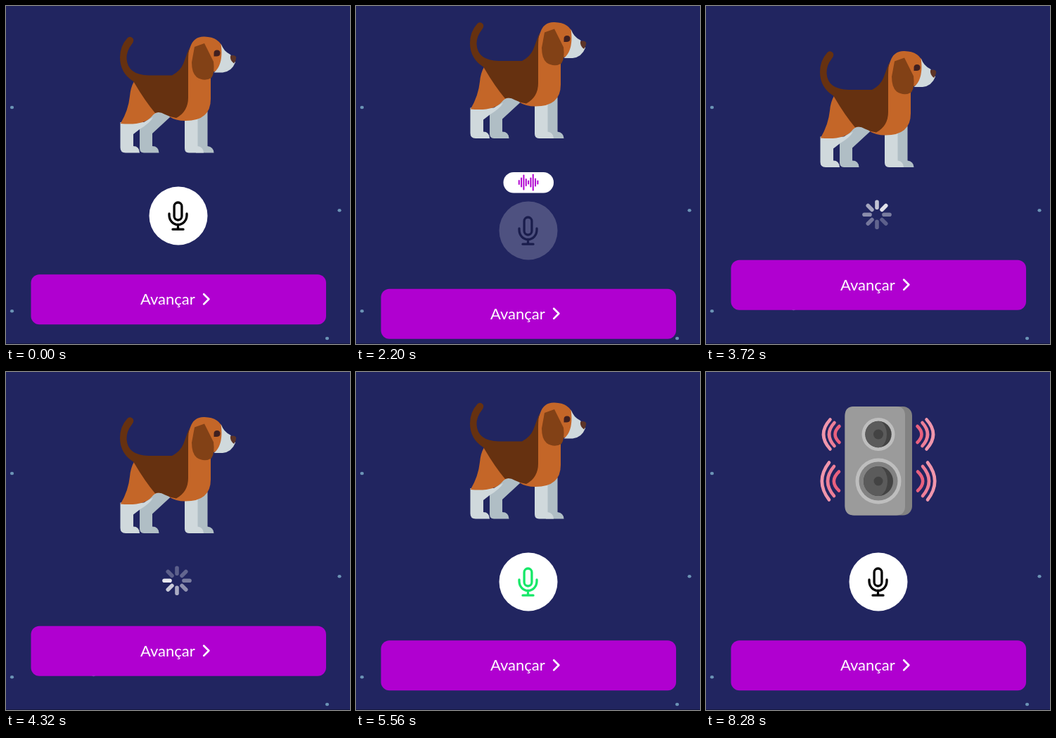
Recreate the animation shown at these times as an HTML page. Size 489 px wide and 480 px high, loop 9520 ms.

```html
<!DOCTYPE html>
<html lang="pt">
<head>
<meta charset="utf-8">
<title>Avançar</title>
<style>
html, body { margin: 0; width: 100%; height: 100%; overflow: hidden; background: #212560; }
svg { display: block; width: 100vw; height: 100vh; }
text { font: 22px Nunito, Lato, sans-serif; }
.line { fill: none; stroke-linecap: round; stroke-linejoin: round; }
</style>
</head>
<body>
<svg viewBox="0 0 489 480">
  <rect width="489" height="480" fill="#212560"/>
  <g id="stars" fill="#6b93b5"></g>
  <rect y="479" width="489" height="1" fill="#15183f"/>

  <g id="dog">
    <!-- far legs -->
    <path fill="#b0bec5" d="M204 158L216 148L234 157L208 181V199Q217 199 217.500 208.500H196Q190 208.500 190 202V172Z"/>
    <path fill="#b0bec5" d="M270 150H286.500V199Q295 200 295.500 208.500H270Z"/>
    <!-- near legs -->
    <path fill="#d0d9dc" d="M162.500 165H196L209 158Q205 166 190 175L181 182V199Q189.500 199 190 208.500H170Q162.500 208.500 162.500 201Z"/>
    <path fill="#d0d9dc" d="M254 158H272.500V199Q280.500 200 281 208.500H260Q254 208.500 254 202Z"/>
    <!-- coat -->
    <path fill="#c46628" d="M182 107Q177 116 176 128Q174 148 162.800 167Q196 170 207 157Q216 145 232 156L236 130Z"/>
    <path fill="#c46628" d="M232 157Q241 163 255 163Q291 163 291 132V94L303 92L309 62Q304 44 282 43.500Q267 43 262 58L257 72V130Z"/>
    <path fill="#663110" d="M181 107Q162 95 162 73Q162 57 172.500 45.500Q176 42 180 45.500Q183 49 179 54Q171 64 171.500 75Q173 98 203 98.500H236Q248 92 252 82L261 58Q259 65 259 78V130Q259 150 242 159Q234 158 226 154Q218 149 212 152Q197 134 183 110Z"/>
    <!-- face -->
    <path fill="#d0d9dc" d="M305.500 53.500Q309 64 319 69L326 80Q321 93 308 94.500H295.500C306 87 308 70 305.500 53.500Z"/>
    <path fill="#5c3428" d="M319 70.500Q326 69 327.300 73Q327 78 324 81.500Q318 77 319 70.500Z"/>
    <path fill="#402020" d="M295.500 67Q295.500 62.500 300 62.500Q304.500 62.500 304.500 67Q304.500 71 300 71.500H295.500Z"/>
    <path fill="#824116" d="M282 53L268 58Q266 69 264 80Q264 95 271 101Q282 108 292 102Q297 95 295 79Z"/>
  </g>

  <g id="speaker">
    <rect x="197.500" y="49" width="95.500" height="154.500" rx="13" fill="#828282"/>
    <path fill="#9b9b9b" d="M210.500 49H270Q283 49 283 62V190.500Q283 203.500 270 203.500H210.500Q197.500 203.500 197.500 190.500V62Q197.500 49 210.500 49Z"/>
    <circle cx="245" cy="88.500" r="23.500" fill="#bebebe"/>
    <circle cx="245" cy="88.500" r="18.700" fill="#434343"/>
    <path fill="#5b5b5b" d="M249 70.200A18.700 18.700 0 1 0 249 106.800Q257 100 257 88.500Q257 77 249 70.200Z"/>
    <circle cx="245" cy="88.500" r="7" fill="#434343"/>
    <circle cx="245" cy="155" r="32.500" fill="#bebebe"/>
    <circle cx="245" cy="155" r="27.500" fill="#828282"/>
    <circle cx="245" cy="155" r="21" fill="#434343"/>
    <path fill="#5b5b5b" d="M249 134.400A21 21 0 1 0 249 175.600Q258 168 258 155Q258 142 249 134.400Z"/>
    <circle cx="245" cy="155" r="6.500" fill="#434343"/>
    <g id="waves" class="line" stroke-width="4.600"></g>
    <use href="#waves" transform="translate(490)scale(-1 1)"/>
  </g>

  <g id="pill">
    <rect x="209.500" y="236" width="71.500" height="29.500" rx="14.750" fill="#fff"/>
    <g id="bars" class="line" stroke="#b000d0" stroke-width="2"></g>
  </g>

  <g id="mic">
    <circle cx="245" cy="298" r="41.500" fill="#fff"/>
    <g id="icon" class="line" stroke-width="3.300">
      <rect x="239.100" y="279" width="10.800" height="25" rx="5.400"/>
      <path d="M232 295V297A12.500 13.500 0 0 0 257 297V295M244.500 310.500V317M237 317.200H252"/>
    </g>
  </g>

  <g id="spinner" class="line" stroke="#fff" stroke-width="5.600"></g>

  <g id="button">
    <rect x="35.500" y="381.300" width="419.500" height="71" rx="12" fill="#b000d0"/>
    <text x="191" y="424" fill="#fff">Avançar</text>
    <path class="line" stroke="#fff" stroke-width="2.700" d="M281.200 409.200L288.300 416.300L281.200 423.400"/>
  </g>
</svg>
<script>
const LOOP = 9520, PRESS = 1040, SHIFT = 20.5, SPIN = 1000;
const $ = id => document.getElementById(id);

function add(parent, tag, attrs) {
  const el = document.createElementNS('http://www.w3.org/2000/svg', tag);
  for (const k in attrs) el.setAttribute(k, attrs[k]);
  return $(parent).appendChild(el);
}

[[8.5, 144], [474, 290.3], [8.5, 433.3], [456.5, 472], [124.5, 430]]
  .forEach(([cx, cy]) => add('stars', 'ellipse', { cx, cy, rx: 2.6, ry: 2.2 }));

// x of the ends, x of the bulge, centre y, half height, colour
[[176.5, 167, 88.5, 21, '#f096ac'], [182.5, 175, 88.5, 16.5, '#ee7f98'], [189.5, 183.5, 88.5, 11.5, '#e9607e'],
 [175, 164.8, 155, 26.5, '#f096ac'], [182, 173, 155, 21, '#ee7f98'], [189, 181.8, 155, 13.5, '#e9607e']]
  .forEach(([x, bulge, y, h, stroke]) =>
    add('waves', 'path', { stroke, d: `M${x} ${y - h}Q${2 * bulge - x} ${y} ${x} ${y + h}` }));

[5, 12, 20, 9, 4, 12, 22, 10, 4].forEach((h, i) => {
  const x = 231.8 + i * 3.32;
  add('bars', 'path', { d: `M${x} ${250.6 - h / 2}v${h}` });
});

const spokes = Array.from({ length: 8 }, (_, i) =>
  add('spinner', 'path', { d: 'M243 286.300V278.300', transform: `rotate(${i * 45} 243 296.300)` }));
const fade = [0.9, 0.76, 0.62, 0.5, 0.4, 0.3, 0.27, 0.27];

// start, layout offset, phase, icon colour, picture
const steps = [
  [0, 0, 'idle', '#000', 'dog'],
  [PRESS + 500, 1, 'listen', '#000', 'dog'],
  [3560, -1, 'load', '#000', 'dog'],
  [4980, 0, 'idle', '#16e868', 'dog'],
  [6480, 0, 'idle', '#000', 'dog'],
  [7200, 0, 'idle', '#000', 'speaker']
];

const show = (id, on) => $(id).setAttribute('display', on ? 'inline' : 'none');
const move = (id, y) => $(id).setAttribute('transform', `translate(0 ${y})`);

// brightness of a spoke that lies `lag` spokes behind the head
function glow(lag) {
  const i = Math.floor(lag), f = lag - i;
  return fade[i % 8] * (1 - f) + fade[(i + 1) % 8] * f;
}

function draw(t) {
  const [, dir, phase, ink, picture] = steps.filter(s => s[0] <= t).pop();
  show('dog', picture === 'dog');
  show('speaker', picture === 'speaker');
  show('pill', phase === 'listen');
  show('mic', phase !== 'load');
  show('spinner', phase === 'load');
  move('dog', -dir * SHIFT);
  move('mic', dir * 21);
  move('button', dir * SHIFT);
  $('icon').setAttribute('stroke', ink);

  // the microphone dims while it is held down
  const held = t >= PRESS && t < steps[2][0];
  const p = held ? Math.min(1, (t - PRESS) / 150) : 0;
  $('mic').setAttribute('opacity', 1 - 0.8 * p * p * (3 - 2 * p));

  const head = 6 + (t - 4320) / SPIN * 8;
  spokes.forEach((s, i) => s.setAttribute('opacity', glow((head - i + 800) % 8)));
}

function tick() {
  draw(performance.now() % LOOP);
  requestAnimationFrame(tick);
}
tick();
</script>
</body>
</html>
```
